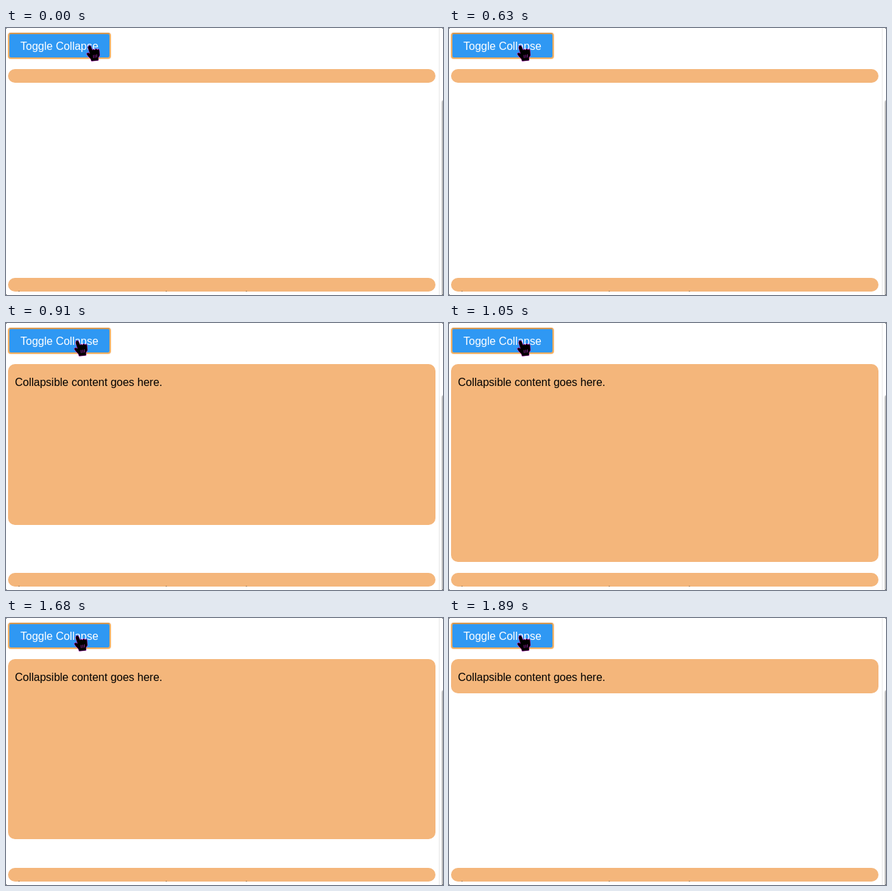
Write an HTML page that moves like this. It is 638 px wide and 390 px high and loops after 1.96 s.

```html
<!DOCTYPE html>
<html lang="en">
<head>
<meta charset="utf-8">
<title>Collapsible panel</title>
<style>
  html, body { margin: 0; width: 100%; height: 100%; overflow: hidden; background: #fff; }
  body { position: relative; font: 16px "Liberation Sans", Arial, sans-serif; }
  body > * { position: absolute; box-sizing: border-box; }
  #button {
    left: 3px; top: 7px; width: 150px; height: 38px; border-radius: 4px;
    border: 2px solid #f2ac5c; border-top-color: #d3954e;
    background: #2f98f3; color: #fff; line-height: 35px; text-align: center;
    box-shadow: 0 0 2px #f4b67b; white-space: nowrap;
  }
  #button.pressed { background: #2468e6; border-color: #2468e6; box-shadow: 0 1px 2px #0002; }
  .panel {
    left: 3px; width: 624px; height: 20px; border-radius: 10px;
    background: #f4b67b; color: #000; overflow: hidden;
  }
  .panel span { position: absolute; left: 10px; top: 17px; line-height: 20px; white-space: nowrap; }
  .panel i { position: absolute; top: 19px; width: 2px; height: 1px; background: #a97e55; }
  #edge { left: 632px; top: 0; width: 1px; height: 390px; background: #e7e7e7; }
  #thumb { left: 636px; top: 105px; width: 8px; height: 290px; border-radius: 4px; background: #bdbdbd; }
  svg { left: 0; top: 0; }
</style>
</head>
<body>
<div id="button">Toggle Collapse</div>
<div class="panel" id="panel" style="top:60px"><span>Collapsible content goes here.</span></div>
<div class="panel" style="top:365px"><i style="left:15px"></i><i style="left:230px"></i><i style="left:347px"></i></div>
<div id="edge"></div>
<div id="thumb"></div>
<svg width="638" height="390" fill="none">
  <path d="M0 0h1v1h-1zM637 0h1v1h-1zM0 389h1v1h-1zM637 389h1v1h-1z" fill="#555"/>
  <g id="ring">
    <circle cx="99" cy="22" r="42" stroke="#fff" stroke-width="6"/>
    <circle cx="99" cy="22" r="42" stroke="#000" stroke-width="3"/>
  </g>
  <g id="cursor" stroke-linejoin="round">
    <path id="hand" d="M3 1L5.5 1.5L8 8L9 6.5L11 7L12 8L12.5 6L14.5 6L15.5 7.5L17 6L18 8L18.5 15L16.5 18L16.5 22L7 23L6 20L2 16L0 12.5L2 11.5L5 13L2 4Z"
      fill="#000" stroke="#d42be0" stroke-width="1.6"/>
    <path d="M3 1L5.5 1.5L8 8L9 6.5L11 7L12 8L12.5 6L14.5 6L15.5 7.5L17 6L18 8L18.5 15L16.5 18L16.5 22L7 23L6 20L2 16L0 12.5L2 11.5L5 13L2 4Z"
      fill="#000" stroke="#000" stroke-width=".6"/>
    <path d="M9.5 14.5L10 19M12 14L12.3 18.5M14.5 13.5V18" stroke="#a52bb0" stroke-width=".8"/>
  </g>
</svg>
<script>
const LOOP = 1960, STEP = 70, CLOSED = 20, OPEN = 300;
const [button, panel, ring, cursor] =
  ['button', 'panel', 'ring', 'cursor'].map(id => document.getElementById(id));

// CSS "ease": cubic-bezier(.25, .1, .25, 1)
function ease(x) {
  if (x <= 0) return 0;
  if (x >= 1) return 1;
  const bezier = (s, a, b) => 3 * s * (1 - s) ** 2 * a + 3 * s * s * (1 - s) * b + s ** 3;
  let low = 0, high = 1;
  for (let i = 0; i < 24; i++) {
    const mid = (low + high) / 2;
    if (bezier(mid, .25, .25) < x) low = mid; else high = mid;
  }
  return bezier(low, .1, 1);
}

function openness(t) {
  if (t < 770) return 0;
  return t < 1610 ? ease((t - 677) / 500) : 1 - ease((t - 1627) / 430);
}

function cursorShift(t) {
  return t < 70 ? 18 : t < 140 ? 7 : t < 280 ? 2 : 0;
}

function draw(now) {
  const t = Math.floor(now % LOOP / STEP) * STEP;
  const sinceClick = t - (t < 1470 ? 490 : 1470);
  const pressed = sinceClick >= 0 && sinceClick < 140;

  button.className = pressed ? 'pressed' : '';
  ring.style.display = pressed ? '' : 'none';
  const scale = sinceClick < 70 ? 1 : 1.06;
  ring.setAttribute('transform', `translate(99 22) scale(${scale}) translate(-99 -22)`);
  ring.setAttribute('opacity', sinceClick < 70 ? 1 : .5);

  panel.style.height = Math.round(CLOSED + (OPEN - CLOSED) * openness(t)) + 'px';
  cursor.setAttribute('transform', `translate(${100 + cursorShift(t)} 25)`);
}

const start = performance.now();
function tick() {
  draw(performance.now() - start);
  requestAnimationFrame(tick);
}
tick();
</script>
</body>
</html>
```
